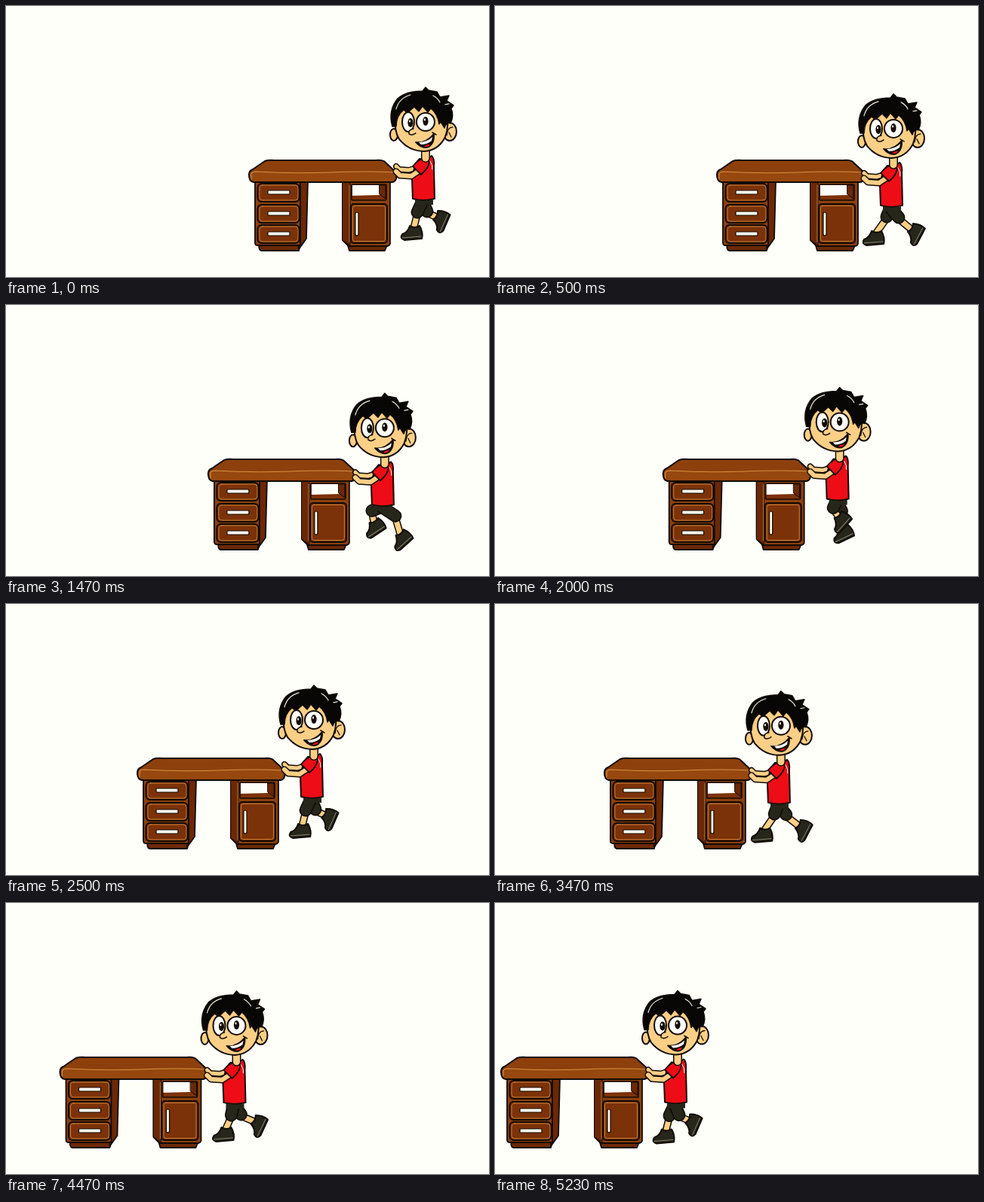
Animation, 640 px wide and 360 px high, one loop 5460 ms. Source, as an HTML page with a canvas:

```html
<!DOCTYPE html>
<html lang="en">
<head>
<meta charset="utf-8">
<title>Pushing a desk</title>
<style>
html, body { margin: 0; width: 100%; height: 100%; overflow: hidden; background: #fffffa; }
canvas { display: block; }
</style>
</head>
<body>
<canvas id="stage" width="640" height="360"></canvas>
<script>
const ctx = document.getElementById('stage').getContext('2d');
const LOOP = 5460, HOME = 322;
const INK = '#120b04', SKIN = '#fbcf86', RED = '#ee0d16', CLOTH = '#26261b', GOLD = '#d89243';
const BROWN = '#8d400c', DARK = '#6b2806', PANEL = '#7c3209';

// Time in ms against the desk's left edge
const slide = [[0, 322], [500, 294], [570, 293], [1000, 268], [1110, 257], [1160, 273], [1470, 268],
  [1700, 242], [2230, 208], [2500, 174], [2770, 170], [2870, 173], [3400, 147], [3470, 145],
  [3970, 104], [4470, 72], [4530, 41], [5100, 6], [5230, 8]];
// Time, steps walked, height of the body
const walk = [[0, 0, -1.5], [500, .78, .5], [1470, 2.45, 1], [2500, 4, -1.5],
  [3470, 5.8, 0], [4470, 7.93, 5.5], [5100, 9, 7]];
// Steps, knee x y, ankle x y, shoe angle
const stride = [[0, 545, 276, 540, 296, 0], [.45, 570, 273, 577, 297, -.65], [.78, 563, 274, 581, 289, -1],
  [.93, 562, 274, 581, 282, -1.05], [1, 558, 275, 572, 281, -1.08], [1.45, 539, 266, 542, 281, -.5],
  [1.78, 547, 273, 532, 294, 0], [1.93, 549, 275, 541, 293, 0], [2, 545, 276, 540, 296, 0]];

function at(keys, t) {
  const i = keys.findIndex(k => k[0] > t);
  if (i < 0) return keys[keys.length - 1].slice(1);
  const a = keys[i - 1], b = keys[i], f = (t - a[0]) / (b[0] - a[0]);
  return a.slice(1).map((v, j) => v + (b[j + 1] - v) * f);
}

function shape(d, fill, line = INK, width = 1.8) {
  const path = new Path2D(d);
  if (fill) { ctx.fillStyle = fill; ctx.fill(path); }
  if (line) { ctx.strokeStyle = line; ctx.lineWidth = width; ctx.stroke(path); }
}

function stroke(d, color, width) { shape(d, null, color, width); }

function limb(d, color, width) {
  stroke(d, INK, width + 3);
  stroke(d, color, width);
}

function oval(x, y, rx, ry, fill, width = 0) {
  ctx.beginPath();
  ctx.ellipse(x, y, rx, ry, 0, 0, 7);
  ctx.fillStyle = fill;
  ctx.fill();
  if (width) { ctx.strokeStyle = INK; ctx.lineWidth = width; ctx.stroke(); }
}

function box(x, y, w, h, r, fill, line, width = 1) {
  ctx.beginPath();
  ctx.roundRect(x, y, w, h, r);
  ctx.fillStyle = fill;
  ctx.fill();
  if (line) { ctx.strokeStyle = line; ctx.lineWidth = width; ctx.stroke(); }
}

function desk() {
  // Drawers
  shape('M336 317H390L388 325H338Q334 323 336 317Z', DARK);
  shape('M387 233H400L398 309L388 323Z', DARK);
  shape('M330 233H390V318H333Q330 318 330 314Z', BROWN);
  for (const y of [236, 264, 291]) {
    box(333.5, y, 55, 24, 5, PANEL, INK, 2);
    box(336, y + 2, 51, 20, 4, PANEL, GOLD, .8);
    box(347, y + 9, 29, 5, 1, '#fffdf0', INK, 1.2);
  }
  // Cupboard
  shape('M453 318H505L502 325H455Z', DARK);
  shape('M446 233H509V316Q508 319 504 319H454L446 311Z', BROWN);
  shape('M446 234H456V318L446 311Z', DARK, INK, 1);
  stroke('M455 238V313', GOLD, .8);
  box(458, 237, 46, 21, 1, PANEL, INK, 1.6);
  shape('M459 238H496V251L459 252Z', '#fffffa', null);
  shape('M495 238H503V256L495 250Z', DARK, INK, 1);
  box(457, 263, 48, 52, 4, PANEL, INK, 2);
  box(459.5, 265.5, 43, 47, 3, PANEL, GOLD, .8);
  box(463, 274, 4, 31, 2, '#fffdf0', INK, 1.2);
  // Top
  shape('M343 206Q348 204 356 205H490Q500 204 503 208L517 221Q519 233 512 234H328Q322 233 322 224Q322 219 327 217Z',
    BROWN, INK, 2);
  shape('M324 221H515Q517 232 511 233H328Q324 232 324 221Z', '#96480f', null);
  stroke('M325 230V223Q326 220 331 220Q380 223 430 221T514 221', GOLD, 1.1);
}

function leg(phase) {
  const [kx, ky, ax, ay, angle] = at(stride, phase % 2);
  limb(`M${kx} ${ky}L${ax} ${ay}`, SKIN, 7);
  limb(`M552 259L${kx} ${ky - 2}`, CLOTH, 14);
  ctx.save();
  ctx.translate(ax, ay);
  ctx.rotate(angle);
  shape('M-5 -4Q1 0 8 -4Q13 5 11 13L-12 15Q-19 13 -15 7Q-8 5 -5 -4Z', CLOTH, INK, 2);
  stroke('M-15 12L10 10', '#85836b', 1);
  ctx.restore();
}

function head() {
  limb('M556 186V202', SKIN, 9);
  oval(514, 171, 5, 8, SKIN, 2);
  oval(588, 167, 9, 12, SKIN, 2);
  stroke('M584 172Q585 161 592 161M587 168L590 174', INK, 1.3);
  shape('M516 145Q514 166 521 177Q534 193 554 193Q573 192 582 174Q588 158 583 140Q550 118 516 145Z', SKIN, INK, 2);
  shape('M512 160Q506 139 519 123Q530 113 552 113L556 108L560 112L571 114L575 121L587 119L584 126L593 132L590 136'
    + 'Q594 146 589 156Q584 153 581 162L576 154L574 157Q572 143 563 136L559 141L552 133L547 140L541 134'
    + 'L532 142L527 138Q517 146 517 160Z', '#080706', INK, 1.5);
  stroke('M517 137Q521 122 536 118M566 119Q572 122 575 128M587 130L582 131', '#eee9d4', 1.2);
  oval(533, 154, 8, 13, '#fffffa', 2);
  oval(556, 154, 12, 12, '#fffffa', 2);
  oval(536, 155, 3.6, 6, INK);
  oval(556, 153, 3.6, 6, INK);
  oval(535, 153, 1, 1.7, '#fffffa');
  oval(555, 151, 1, 1.7, '#fffffa');
  shape('M540 163Q533 164 534 170Q538 173 543 169', SKIN, INK, 1.5);
  shape('M543 181Q556 183 567 170Q568 184 558 188Q550 189 543 181Z', INK, INK, 1.8);
  shape('M547 181Q558 181 565 174L564 179Q558 184 550 184Z', '#fffffa', null);
  shape('M554 187Q558 183 562 184Q559 188 554 187Z', RED, null);
  stroke('M565 168L570 171', INK, 1.6);
}

function boy(steps) {
  leg(steps + 1);
  leg(steps);
  limb('M547 214L534 218L521 217L517 213', SKIN, 5);
  shape('M548 203Q556 206 564 199Q568 202 567 213L568 256Q553 260 539 256L538 229Q541 215 543 209Z', RED, INK, 2);
  shape('M542 257Q554 260 566 257L566 264H542Z', CLOTH, null);
  limb('M549 218L537 226L522 225L517 220', SKIN, 6);
  shape('M557 201Q547 203 539 213L550 224Q560 216 561 207Z', RED, INK, 1.8);
  stroke('M562 206Q566 212 565 217', '#fffffa', 1);
  head();
}

function frame(now) {
  const t = now % LOOP;
  const [x] = at(slide, t), [steps, base] = at(walk, t);
  const bob = 5.5 * (1 - Math.cos(2 * Math.PI * (steps - .12)));
  ctx.fillStyle = '#fffffa';
  ctx.fillRect(0, 0, 640, 360);
  ctx.save();
  ctx.lineCap = ctx.lineJoin = 'round';
  ctx.translate(x - HOME, 0);
  desk();
  ctx.translate(0, base + bob);
  boy(steps);
  ctx.restore();
}

const start = performance.now();
function tick() {
  frame(performance.now() - start);
  requestAnimationFrame(tick);
}
tick();
</script>
</body>
</html>
```
